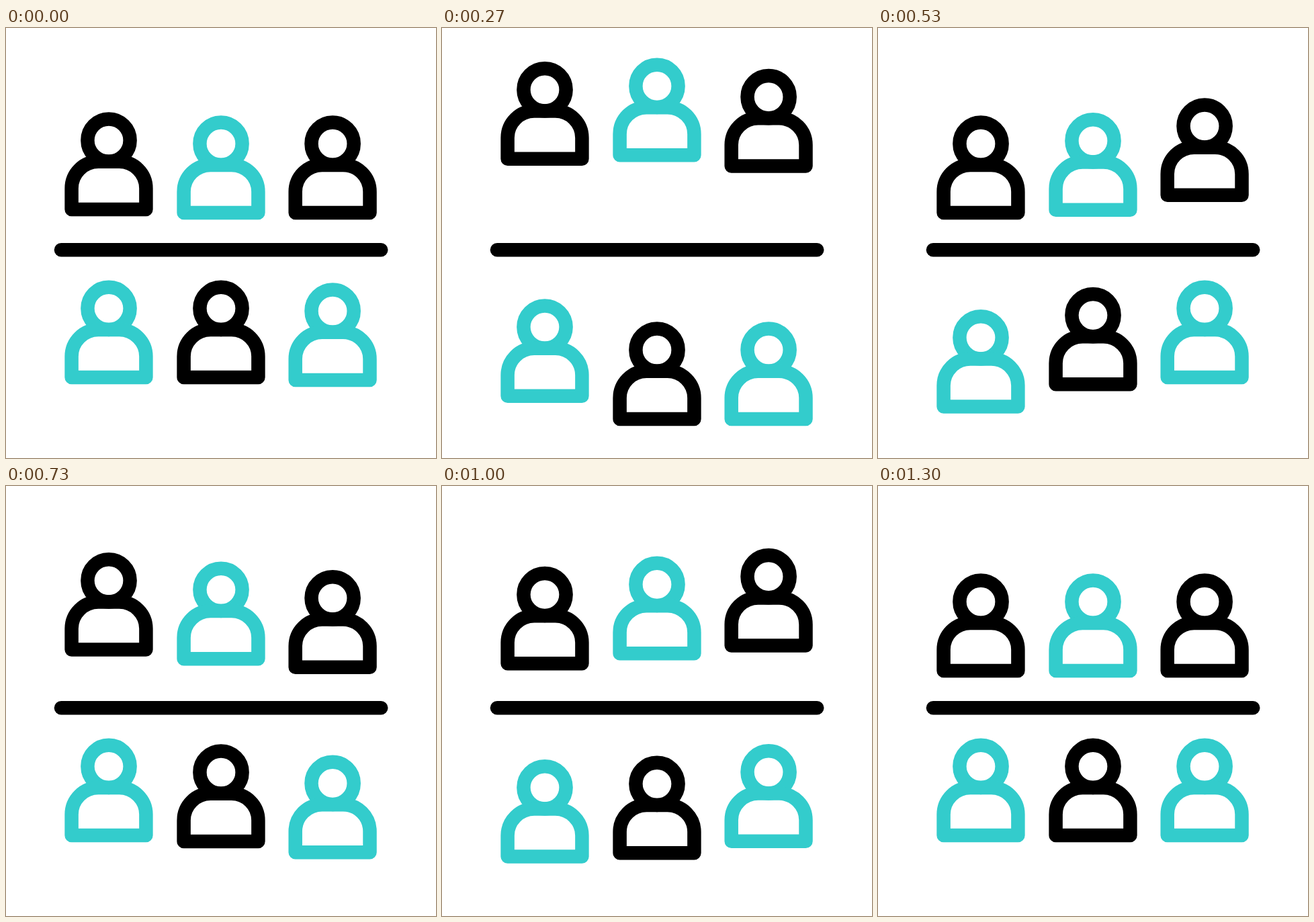
An HTML page for the animation above (1.67 s loop, 640x640 px).

```html
<!DOCTYPE html>
<html>
<head>
<meta charset="utf-8">
<style>
  html, body { margin: 0; width: 100%; height: 100%; overflow: hidden; background: #fff; }
  svg { display: block; width: 100vw; height: 100vh; }
</style>
</head>
<body>
<svg viewBox="0 0 640 640" fill="none" stroke-width="20.5" stroke-linecap="round" stroke-linejoin="round">
  <defs>
    <g id="person">
      <circle cy="172.2" r="31.6"/>
      <path d="M-55.4 275V243.7A39.8 39.8 0 0 1 -15.6 203.9H15.6A39.8 39.8 0 0 1 55.4 243.7V275Z"/>
    </g>
  </defs>
  <path d="M82 330.2H558.2" stroke="#000"/>
</svg>
<script>
const LOOP = 1670, STEP = 100 / 3;
const BLACK = '#000', TEAL = '#3cc';
const svg = document.querySelector('svg');

// x, resting y, colour, delay in steps, heights of the two hops
const people = [
  [153, 0, BLACK, 0, -86.4, -40],
  [320, 0, TEAL, 2, -86.4, -40],
  [486.1, 0, BLACK, 4, -86.4, -40],
  [153, 245.1, TEAL, 6, 66.5, 32],
  [320, 245.1, BLACK, 3, 66.5, 32],
  [486.1, 245.1, TEAL, 0, 66.5, 32]
].map(([x, y, colour, delay, first, second]) => {
  const node = document.createElementNS('http://www.w3.org/2000/svg', 'use');
  node.setAttribute('href', '#person');
  node.setAttribute('stroke', colour);
  svg.append(node);
  return { node, x, y, delay, first, second };
});

const sine = u => (1 - Math.cos(Math.PI * u)) / 2;

// cubic-bezier(.31, 0, .56, 1)
function launch(u) {
  let lo = 0, hi = 1;
  for (let i = 0; i < 20; i++) {
    const s = (lo + hi) / 2, r = 1 - s;
    if (0.93 * s * r * r + 1.68 * s * s * r + s ** 3 < u) lo = s; else hi = s;
  }
  return lo * lo * (3 - 2 * lo);
}

function hop(t, start, peak, end, rise) {
  if (t <= start || t >= end) return 0;
  return t < peak ? rise((t - start) / (peak - start)) : sine((end - t) / (end - peak));
}

function draw(now) {
  const step = Math.floor((now % LOOP + 4) / STEP) + 1;
  for (const { node, x, y, delay, first, second } of people) {
    const t = step - delay;
    const dy = first * hop(t, 0, 7.5, 16.25, launch) + second * hop(t, 16.9, 25.7, 33.8, sine);
    node.setAttribute('transform', `translate(${x} ${y + dy})`);
  }
  requestAnimationFrame(draw);
}
draw(performance.now());
</script>
</body>
</html>
```
